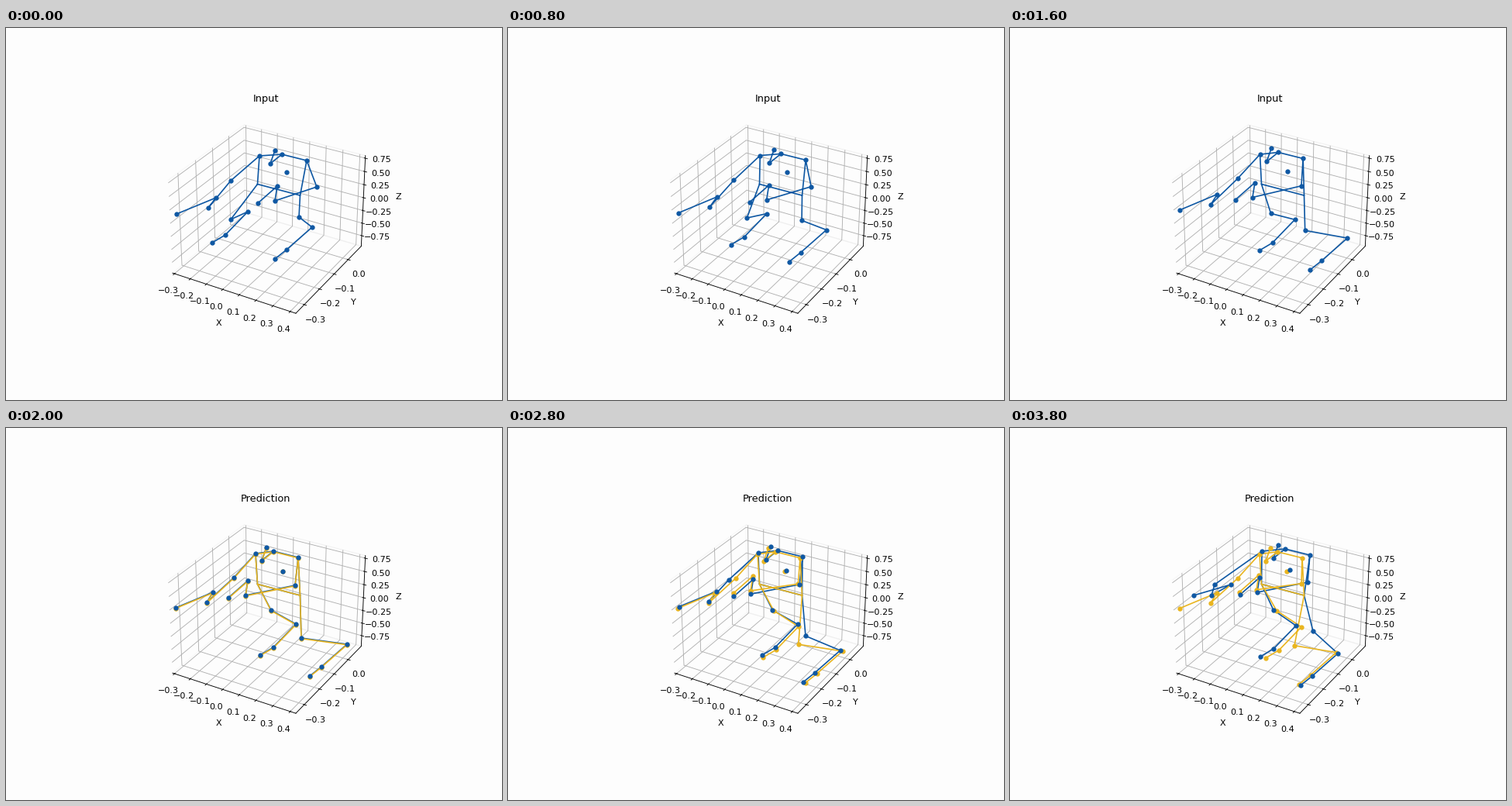
These frames come from a looping animation (640x480 px, 4000 ms). A matplotlib script:

```python
import numpy as np
import matplotlib.pyplot as plt
from matplotlib.animation import FuncAnimation

W, H, DPI = 640, 480, 80
FRAMES, INTERVAL = 20, 200
SWITCH = 10  # the forecast starts here
PAPER, BLUE, GOLD = "#fdfdfd", "#0f58a3", "#e9b520"


class Path:
    """A joint going from start over mid to end; its forecast drifts off mid."""

    def __init__(self, start, mid, end, pace=1.5, drift=(0, 0)):
        self.start, self.mid, self.end, self.drift = map(np.array, (start, mid, end, drift))
        self.pace = pace

    def real(self, t):
        if t < SWITCH:
            u = t / SWITCH
            ease = np.array([u * u * (3 - 2 * u), u * u])
            return self.start + (self.mid - self.start) * ease
        s = (t - SWITCH) / (FRAMES - 1 - SWITCH)
        return self.mid + (self.end - self.mid) * s ** self.pace

    def guess(self, t):
        s = (t - SWITCH) / (FRAMES - 1 - SWITCH)
        return self.mid + (0, 0.7) + self.drift * np.array([s, 1 - (1 - s) ** 3])


PATHS = {
    "neck": Path((356, 163), (345, 159), (355, 156)),
    "shoulder_l": Path((327, 165), (322, 162), (325, 159)),
    "elbow_l": Path((290, 197), (294, 193), (264, 202)),
    "wrist_l": Path((261, 232), (259, 225), (260, 216), 2.5),
    "palm_l": Path((271, 219), (267, 212), (285, 202), 2.5),
    "hand_l": Path((220, 240), (219, 232), (237, 216), 3),
    "elbow_r": Path((401, 205), (373, 203), (384, 199), drift=(3, -3)),
    "wrist_r": Path((347, 223), (309, 216), (319, 212), 1, drift=(9, -8)),
    "knee_l": Path((290, 247), (342, 235), (340, 235), drift=(2, 0)),
    "ankle_l": Path((312, 237), (374, 253), (369, 255), 3, drift=(2, 3)),
    "knee_r": Path((378, 244), (381, 271), (391, 262), drift=(-14, 9)),
    "ankle_r": Path((395, 257), (440, 279), (423, 291), 0.5, drift=(-19, 10)),
}

# bones that keep their length and direction: joint, parent, offset
RIGID = [
    ("shoulder_r", "neck", (32, 8)),
    ("nose", "neck", (-15, 12)),
    ("crown", "nose", (6, -17)),
    ("palm_r", "wrist_r", (3, -19)),
    ("hand_r", "palm_r", (-25, 22)),
    ("heel_l", "ankle_l", (-29, 30)),
    ("toe_l", "heel_l", (-17, 10)),
    ("heel_r", "ankle_r", (-33, 29)),
    ("toe_r", "heel_r", (-15, 12)),
]
HIPS = {"hip_l": np.array([324.5, 201.5]), "hip_r": np.array([379.5, 216])}

CHAINS = [chain.split() for chain in (
    "shoulder_l elbow_l wrist_l palm_l hand_l",
    "shoulder_r elbow_r wrist_r palm_r hand_r",
    "shoulder_l neck shoulder_r",
    "neck nose crown",
    "shoulder_l hip_l hip_r shoulder_r",
    "hip_l knee_l ankle_l heel_l toe_l",
    "hip_r knee_r ankle_r heel_r toe_r",
)]


def body(joints):
    """Complete the moving joints with the ones that follow them."""
    for name, parent, offset in RIGID:
        joints[name] = joints[parent] + offset
    joints["chest"] = 0.37 * joints["neck"] + (229.8, 125.7)
    return joints


def actual(t):
    return body({name: path.real(t) for name, path in PATHS.items()})


def predicted(t):
    return body({name: path.guess(t) for name, path in PATHS.items()})


fig = plt.figure(figsize=(W / DPI, H / DPI), dpi=DPI, facecolor=PAPER)

side = 283
ax = fig.add_axes([193.6 / W, 94 / H, side / W, side / H], projection="3d")
ax.set_facecolor(PAPER)
ax.set(xlabel="X", ylabel="Y", zlabel="Z")
ax.set_xticks(np.arange(-3, 5) / 10)
ax.set_yticks(np.arange(-3, 1) / 10)
ax.set_zticks(np.arange(-3, 4) / 4)
ax.set_xlim(-0.312, 0.432)
ax.set_ylim(-0.354, 0.097)
ax.set_zlim(-0.961, 0.799)
for axis in (ax.xaxis, ax.yaxis, ax.zaxis):
    axis.pane.set_fill(False)
title = ax.set_title("Input", fontsize=11.6, pad=7.2)

stage = fig.add_axes([0, 0, 1, 1], zorder=5)
stage.set_xlim(0, W)
stage.set_ylim(H, 0)
stage.axis("off")


def skeleton(color, line_z, dot_z):
    line, = stage.plot([], [], color=color, lw=1.5, zorder=line_z)
    dots, = stage.plot([], [], "o", color=color, ms=5.7, mew=0, zorder=dot_z)
    return line, dots


def pose(parts, joints):
    line, dots = parts
    dots.set_data(*np.array(list(joints.values())).T)
    points = joints | HIPS
    gap = [(np.nan, np.nan)]
    line.set_data(*np.vstack([[points[n] for n in chain] + gap for chain in CHAINS]).T)


real = skeleton(BLUE, 2, 5)
forecast = skeleton(GOLD, 3, 4)


def draw(i):
    predicting = i >= SWITCH
    title.set_text("Prediction" if predicting else "Input")
    pose(real, actual(i))
    for artist in forecast:
        artist.set_visible(predicting)
    if predicting:
        pose(forecast, predicted(i))
    return (title, *real, *forecast)


anim = FuncAnimation(fig, draw, frames=FRAMES, interval=INTERVAL,
                     repeat=True, repeat_delay=0, blit=False)
plt.show()
```
